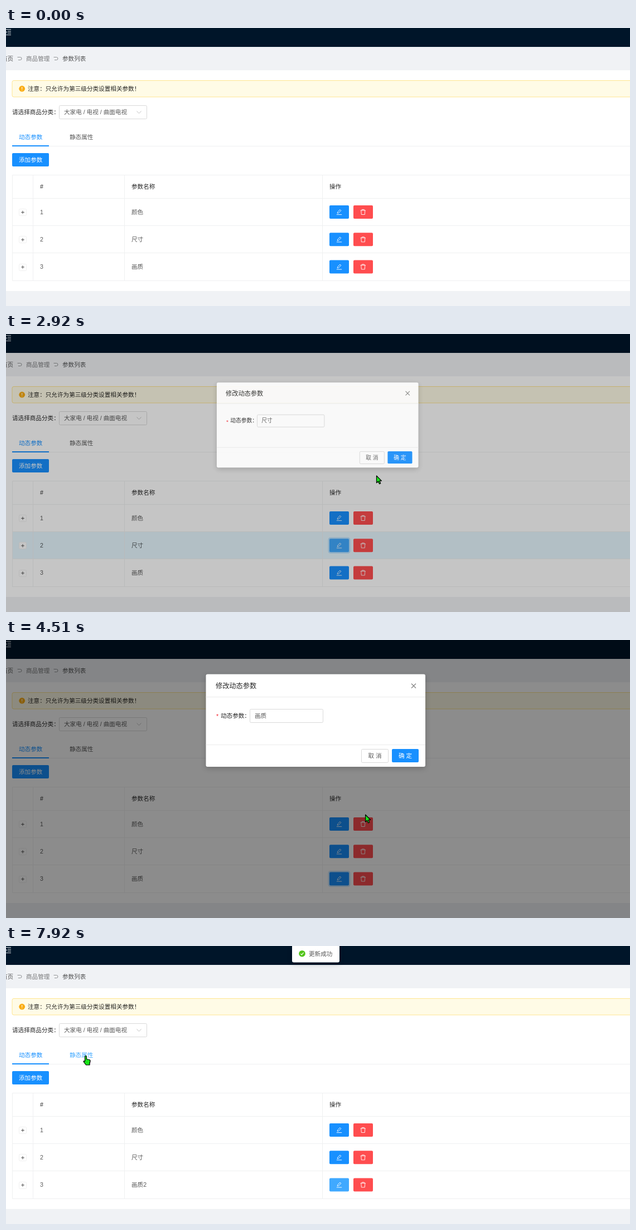
Recreate the animation shown at these times as an HTML page. Size 1119 px wide and 500 px high, loop 8000 ms.

```html
<!DOCTYPE html>
<html lang="zh-CN">
<head>
<meta charset="utf-8">
<style>
html, body { margin: 0; width: 100%; height: 100%; overflow: hidden; background: #fff; }
svg { display: block; width: 100%; height: 100%; }
text { font-family: "Liberation Sans", "Noto Sans CJK SC", "Noto Sans CJK", sans-serif; }
</style>
</head>
<body>
<svg id="stage" viewBox="0 0 1119 500"></svg>
<script>
const LOOP = 8000, BLUE = '#1890ff', LIGHT = '#40a9ff', RED = '#ff4d4f';
const DARK = 'rgba(0,0,0,.85)', GREY = 'rgba(0,0,0,.65)', LINE = '#eff0f1';
const ROWS = [331, 380.3, 429.5], EDGES = [306.5, 355.5, 404.5, 454.5];

// Dialogs: opening time, closing time, table row
const DIALOGS = [[1080, 1760, 0], [2330, 2840, 1], [4050, 6752, 2]];
const TYPED = 5630, FOCUS = 5330, BLUR = 6440, SAVED = 6950;

// Pointer path: time, x, y
const PATH = [
  [360, 690, 505], [700, 640, 400], [920, 599, 331], [1120, 599, 331], [1280, 606, 326],
  [1640, 660, 209], [1760, 660, 209], [2150, 600, 378], [2320, 600, 378], [2700, 661, 208],
  [2830, 661, 210], [2920, 664, 254], [3300, 645, 355], [3740, 604, 400], [3880, 600, 428],
  [4100, 600, 428], [4510, 644, 314], [4750, 652, 240], [5270, 500, 137], [5680, 500, 137],
  [6350, 713, 208], [6790, 713, 208], [7150, 480, 290], [7560, 208, 342], [7880, 143, 197],
  [8001, 143, 197]
];

// Times during which rows are tinted and buttons glow or stay focused
const TINT = [[[820, 1100]], [[2080, 2330], [2850, 3350]], [[3800, 4050]]];
const GLOW = [[[1060, 1400]], [[2300, 2600], [2850, 3100]], [[4000, 4520]]];
const FOCUSED = [[[1810, 2300]], [[2890, 3950]], [[6850, LOOP]]];

const clamp = v => Math.max(0, Math.min(1, v));
const within = (t, a, b) => t >= a && t < b;
const during = (t, spans) => spans.some(([a, b]) => within(t, a, b));
const fade = (t, spans) => Math.max(...spans.map(([a, b]) => clamp(Math.min(t - a, b - t) / 60)));

function bezier(x1, y1, x2, y2) {
  const at = (s, a, b) => 3 * (1 - s) ** 2 * s * a + 3 * (1 - s) * s * s * b + s ** 3;
  return x => {
    let lo = 0, hi = 1;
    for (let i = 0; i < 20; i++) {
      const mid = (lo + hi) / 2;
      if (at(mid, x1, x2) < x) lo = mid; else hi = mid;
    }
    return at(hi, y1, y2);
  };
}
const outCirc = bezier(.08, .82, .17, 1), inOutCirc = bezier(.78, .14, .15, .86);

const text = (x, y, s, fill = GREY, size = 10.6, more = '') =>
  `<text x="${x}" y="${y + size * .37}" font-size="${size}" fill="${fill}" ${more}>${s}</text>`;
const rect = (x, y, w, h, fill, more = '') =>
  `<rect x="${x}" y="${y}" width="${w}" height="${h}" fill="${fill}" ${more}/>`;
const path = (d, stroke, width = 1, more = '') =>
  `<path d="${d}" fill="none" stroke="${stroke}" stroke-width="${width}" ${more}/>`;
const circle = (x, y, r, fill) => `<circle cx="${x}" cy="${y}" r="${r}" fill="${fill}"/>`;
const box = (x, y, w, h, stroke, fill = '#fff') =>
  rect(x + .5, y + .5, w - 1, h - 1, fill, `rx="2" stroke="${stroke}"`);
const ring = (x, y, w, h) =>
  rect(x - 1, y - 1, w + 2, h + 2, 'none', `rx="3" stroke="${LIGHT}" stroke-width="3" stroke-opacity=".28"`);
const at = (x, y, s) => `<g transform="translate(${x} ${y})">${s}</g>`;

const PENCIL = path('M-4.7 4.6h9.4M-3.3 2.2l.5-2.3 4.3-4.3 1.8 1.8-4.3 4.3z', '#fff', .9);
const TRASH = path('M-4.7-2.9h9.4M-2-2.9v-1.6h4v1.6M-3.5-2.9l.5 7.4h6l.5-7.4', '#fff', .9);

function pointer(t) {
  const i = PATH.findIndex(k => k[0] > t) - 1;
  if (i < 0) return null;
  const a = PATH[i], b = PATH[i + 1], span = b[0] - a[0], u = (t - a[0]) / span;
  const same = (p, q) => p[1] === q[1] && p[2] === q[2];
  const slope = (j, c) => {
    const p = PATH[j - 1], k = PATH[j], n = PATH[j + 1];
    return !p || !n || same(p, k) || same(k, n) ? 0 : (n[c] - p[c]) / (n[0] - p[0]);
  };
  return [1, 2].map(c =>
    a[c] * (1 - u) ** 2 * (1 + 2 * u) + b[c] * u * u * (3 - 2 * u) +
    span * u * (1 - u) * (slope(i, c) * (1 - u) - slope(i + 1, c) * u));
}

// Name of the control below the pointer
function hit(pos, modal) {
  if (!pos) return '';
  const [x, y] = pos;
  const over = (l, top, w, h) => x >= l && x <= l + w && y >= top && y <= top + h;
  if (modal) {
    if (over(692, 196, 48, 24)) return 'ok';
    if (over(637, 196, 49, 24)) return 'cancel';
    return over(437, 124, 132, 25) ? 'input' : '';
  }
  if (over(114, 182, 42, 30)) return 'tab';
  const row = ROWS.findIndex(r => Math.abs(y - r) <= 12);
  if (row >= 0 && over(580, 0, 35, 500)) return 'edit' + row;
  if (row >= 0 && over(623, 0, 35, 500)) return 'delete' + row;
  return '';
}

function header() {
  return rect(0, 0, 1119, 500, '#f0f2f5') + rect(0, 0, 1119, 34, '#001529') +
    path('M0 2.5h9M3 5.8h6M3 9h6M0 12.3h9M0 5.5l1.5 2-1.5 2', '#e4e7ea') +
    text(-8, 55, '首页') + text(36, 55, '商品管理', 'rgba(0,0,0,.5)') + text(101, 55, '参数列表') +
    [20.5, 85.5].map(x => path(`M${x} 52.5h5a2.5 2.5 0 0 1 0 5h-3.5`, '#858789', .9)).join('');
}

function filters(hover) {
  return rect(0, 76, 1119, 397, '#fff') +
    rect(11, 94.5, 1130, 29.5, '#fffbe6', 'rx="3" stroke="#ffe58f"') +
    circle(28.7, 109.2, 5.4, '#faad14') + rect(28.2, 106, 1, 4, '#fff') + rect(28.2, 111.2, 1, 1.1, '#fff') +
    text(39, 109, '注意：只允许为第三级分类设置相关参数！', DARK) +
    text(11, 151.5, '请选择商品分类：', DARK) +
    box(95, 139, 158, 25, '#d9d9d9') + text(104, 151.5, '大家电 / 电视 / 曲面电视') +
    path('M234.5 149.5l4 4 4-4', '#bfbfbf') +
    text(23, 196, '动态参数', BLUE) + text(114, 196, '静态属性', hover === 'tab' ? LIGHT : GREY) +
    rect(11, 212, 1108, 1, LINE) + rect(11, 211, 66, 2, BLUE) +
    rect(11, 225, 66, 24, BLUE, 'rx="2"') + text(23, 237, '添加参数', '#fff');
}

function table(t, hover) {
  const names = ['颜色', '尺寸', t < SAVED ? '画质' : '画质2'];
  const tints = EDGES.slice(0, 3).map((y, i) =>
    rect(11, y, 1108, EDGES[i + 1] - y, '#e6f7ff', `opacity="${fade(t, TINT[i])}"`)).join('');
  const grid = path('M1119 264.5H11.5V454.5H1119M11 306.5h1108M11 355.5h1108M11 404.5h1108' +
    'M48.5 264v190M212.5 264v190M567.5 264v190', LINE);
  const heads = text(61, 285.5, '#', DARK) + text(225, 285.5, '参数名称', DARK) + text(580, 285.5, '操作', DARK);
  const rows = ROWS.map((y, i) => {
    const edit = hover === 'edit' + i || during(t, FOCUSED[i]) ? LIGHT : BLUE;
    return box(23, Math.round(y) - 6, 14, 13, '#f0f0f0') +
      path(`M27.2 ${y + .5}h5.6M30 ${y - 2.3}v5.6`, '#444', .9) +
      text(61, y, i + 1) + text(225, y, names[i]) +
      (during(t, GLOW[i]) ? ring(580, y - 12, 35, 24) : '') +
      rect(580, y - 12, 35, 24, edit, 'rx="2"') + at(597.5, y, PENCIL) +
      rect(623, y - 12, 35, 24, hover === 'delete' + i ? '#ff7875' : RED, 'rx="2"') + at(640.3, y, TRASH);
  }).join('');
  return tints + grid + heads + rows;
}

function dialog(t, [open, close, row], hover) {
  const closing = t >= close;
  const p = closing ? 1 - inOutCirc(clamp((t - close) / 300)) : outCirc(clamp((t - open) / 300));
  const shade = .45 * (closing ? 1 - clamp((t - close) / 165) : clamp((t - open) / 200));
  const scale = .2 + .8 * p, cy = ROWS[row];
  const value = row === 2 ? (closing ? '颜色' : t < TYPED ? '画质' : '画质2') : ['颜色', '尺寸'][row];
  const focus = within(t, FOCUS, BLUR), edge = focus || hover === 'input' ? LIGHT : '#d9d9d9';
  const caret = focus && (t - FOCUS) % 1000 < 500;
  const cancel = hover === 'cancel';
  return rect(0, 0, 1119, 500, '#000', `opacity="${shade}"`) +
    `<g opacity="${p}" transform="translate(598 ${cy}) scale(${scale}) translate(-598 ${-cy})">` +
    rect(358.5, 61.5, 393.5, 166.5, '#fff', 'rx="3" style="filter:drop-shadow(0 3px 5px rgba(0,0,0,.2))"') +
    rect(358.5, 102, 393.5, 1, '#ebebeb') + rect(358.5, 188, 393.5, 1, '#ebebeb') +
    text(376, 82.3, '修改动态参数', DARK, 12.2) +
    path('M727 78.5l8 8M735 78.5l-8 8', 'rgba(0,0,0,.5)', 1.1) +
    text(377, 137.5, '*', '#f5222d') + text(385, 136, '动态参数：', DARK) +
    (focus ? ring(437, 124, 132, 25) : '') + box(437, 124, 132, 25, edge) + text(446, 136, value) +
    (caret ? rect(t < TYPED ? 467.7 : 473.6, 130, 1, 13, '#333') : '') +
    box(637, 196, 49, 25, cancel ? LIGHT : '#d9d9d9') +
    text(661.5, 208.3, '取 消', cancel ? LIGHT : GREY, 10.6, 'text-anchor="middle"') +
    (within(t, BLUR, 6900) ? ring(692, 196, 48, 24) : '') +
    rect(692, 196, 48, 24, hover === 'ok' ? LIGHT : BLUE, 'rx="2"') +
    text(716, 208.3, '确 定', '#fff', 10.6, 'text-anchor="middle"') + '</g>';
}

function message(t) {
  const p = outCirc(clamp((t - SAVED - 60) / 300));
  return `<g opacity="${p}" transform="translate(0 ${(p - 1) * 30})">` +
    rect(513, -2, 85, 31.5, '#fff', 'rx="3" style="filter:drop-shadow(0 3px 4px rgba(0,0,0,.18))"') +
    circle(531, 13.7, 5.8, '#52c41a') + path('M528.4 13.8l1.9 2 3.3-4', '#fff', 1.2) +
    text(543, 13.7, '更新成功') + '</g>';
}

function cursor([x, y], hover) {
  if (hover === 'input') return at(x, y, path('M-3-8q3 0 3 2v12q0 2-3 2M3-8q-3 0-3 2M3 8q-3 0-3-2', '#111', 1.2));
  const shape = hover
    ? 'M-1.5 1.5q1.5-2 3 0v5l5 1q2 .5 1.5 3l-1 4v2.5h-6.5l-4.5-6q0-2 2.5-.5z'
    : 'M.5.5v13l3-2.8 2 4.6 2.2-1-2-4.5h3.8z';
  return at(x, y, `<path d="${shape}" fill="#18e418" stroke="#000" stroke-width="1.2" stroke-linejoin="round"/>`);
}

function scene(t) {
  const current = DIALOGS.find(([open, close]) => within(t, open, close + 300));
  const pos = pointer(t);
  const hover = hit(pos, current && t < current[1] + 200);
  return header() + filters(hover) + table(t, hover) +
    (current ? dialog(t, current, hover) : '') +
    (t > SAVED ? message(t) : '') + (pos ? cursor(pos, hover) : '');
}

const stage = document.getElementById('stage'), start = performance.now();
function draw() {
  stage.innerHTML = scene((performance.now() - start) % LOOP);
  requestAnimationFrame(draw);
}
draw();
</script>
</body>
</html>
```
